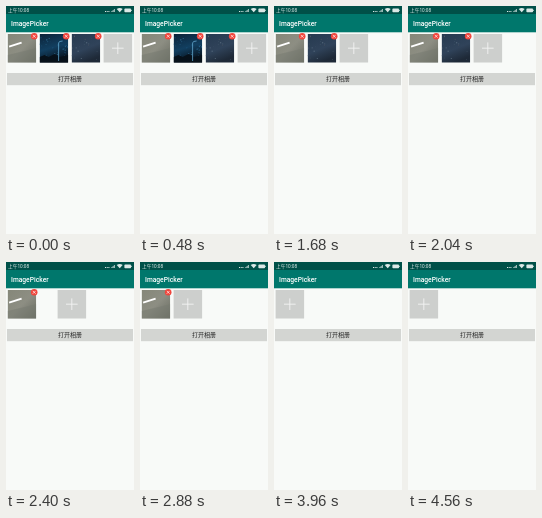
Recreate the animation shown at these times as an HTML page. Size 128x228 px, loop 4.68 s.

```html
<!DOCTYPE html>
<html lang="zh">
<head>
<meta charset="utf-8">
<title>ImagePicker</title>
<style>
  html, body { margin: 0; width: 100%; height: 100%; overflow: hidden; background: #f8faf8; }
  svg { display: block; width: 100vw; height: 100vh; }
  text { font-family: Roboto, "Noto Sans CJK SC", "Noto Sans CJK", sans-serif; }
</style>
</head>
<body>
<svg viewBox="0 0 128 228">
  <defs>
    <clipPath id="tile"><path d="M0 0h28.5v28.5H0z"/></clipPath>
    <linearGradient id="wall" x2="1" y2="1">
      <stop stop-color="#858779"/><stop offset=".5" stop-color="#8d8e83"/><stop offset="1" stop-color="#66695f"/>
    </linearGradient>
    <linearGradient id="night" x2=".3" y2="1">
      <stop stop-color="#0b2237"/><stop offset=".55" stop-color="#123f60"/><stop offset="1" stop-color="#07121d"/>
    </linearGradient>
    <linearGradient id="sky" x2=".4" y2="1">
      <stop stop-color="#263a50"/><stop offset=".6" stop-color="#30435a"/><stop offset="1" stop-color="#1e2937"/>
    </linearGradient>
    <g id="close">
      <circle cx="26.6" cy="2.3" r="3.3" fill="#f0453c"/>
      <path d="M25.2 .9l2.8 2.8m0-2.8l-2.8 2.8" stroke="#fff" stroke-width=".7"/>
    </g>
  </defs>

  <rect width="128" height="228" fill="#f8faf8"/>
  <rect y="8" width="128" height="18.3" fill="#00776c"/>
  <rect width="128" height="8" fill="#005048"/>
  <text x="2" y="6.1" font-size="4.7" fill="#e4efed">上午10:08</text>
  <g fill="#dbe8e6">
    <path d="M99 5h1v1h-1zm1.7 0h1v1h-1zm1.7 0h1v1h-1z"/>
    <path d="M105.5 6v-1h.8v1zm1.2 0v-2h.8v2zm1.2 0v-3h.8v3z"/>
    <path d="M113.7 6.3l-3-3.2q3-2 6 0z"/>
    <rect x="118.4" y="2.6" width="6.6" height="3.6" rx=".8"/>
    <path d="M125.3 3.7h.7v1.4h-.7z"/>
  </g>
  <text x="5" y="19.5" font-size="6.7" font-weight="500" fill="#fff">ImagePicker</text>

  <g id="first">
    <g clip-path="url(#tile)">
      <rect width="29" height="29" fill="url(#wall)"/>
      <path d="M0 21L29 14V29H0z" fill="#777a70" opacity=".5"/>
      <path d="M1.5 12.6L14 8.6" stroke="#fff" stroke-width="2"/>
    </g>
    <use href="#close"/>
  </g>
  <g id="second">
    <g clip-path="url(#tile)">
      <rect width="29" height="29" fill="url(#night)"/>
      <g id="lights"></g>
      <path d="M0 29V23l5-2 4 2 6-3 5 3 9-2v8z" fill="#07111a"/>
      <path d="M19 27V9q0-2 4-2" fill="none" stroke="#62a8cf" stroke-width=".8"/>
    </g>
    <use href="#close"/>
  </g>
  <g id="third">
    <g clip-path="url(#tile)">
      <rect width="29" height="29" fill="url(#sky)"/>
      <g id="stars"></g>
    </g>
    <use href="#close"/>
  </g>
  <g id="add">
    <rect width="28.5" height="28.5" fill="#cdcfcd"/>
    <path d="M14.2 8.4v11.6M8.4 14.2h11.6" stroke="#f3f4f3" stroke-width=".9"/>
  </g>

  <rect x="1" y="67" width="126" height="12.2" fill="#d3d5d2"/>
  <text x="64" y="75.2" font-size="6" text-anchor="middle" fill="#222">打开相册</text>
</svg>
<script>
const LOOP = 4680, STEP = 120, FADE = 120, MOVE = 250, PITCH = 32;
const REMOVALS = [1200, 2165, 3157];
const el = id => document.getElementById(id);

function scatter(id, count, seed, colors) {
  const random = () => (seed = seed * 16807 % 2147483647) / 2147483647;
  for (let i = 0; i < count; i++) {
    const dot = document.createElementNS("http://www.w3.org/2000/svg", "circle");
    const attrs = {
      cx: random() * 28, cy: 2 + random() * 24, r: .25 + random() * .45,
      fill: colors[i % colors.length], opacity: .5 + random() * .4
    };
    for (const name in attrs) dot.setAttribute(name, attrs[name]);
    el(id).append(dot);
  }
}
scatter("lights", 38, 71, ["#2773a3", "#184e78", "#3e8dba"]);
scatter("stars", 20, 29, ["#6d8091", "#526579", "#786861"]);

const clamp = v => Math.max(0, Math.min(1, v));
const progress = (t, start, duration) => clamp((t - start) / duration);
const ease = p => (1 - Math.cos(Math.PI * p)) / 2;

function place(id, slot, opacity) {
  el(id).setAttribute("transform", `translate(${1.6 + slot * PITCH} 28)`);
  el(id).setAttribute("opacity", opacity);
}

function draw(t) {
  const [a, b, c] = REMOVALS;
  const fade = start => 1 - progress(t, start, FADE);
  const slide = start => ease(progress(t, start + FADE, MOVE));
  const addOpacity = t < a ? 1 : progress(t, a + FADE + MOVE - 20, FADE);
  const addSlot = (t < a ? 3 : 2) - slide(b) - slide(c);

  place("first", 0, fade(c));
  place("second", 1, fade(a));
  place("third", 2 - slide(a), fade(b));
  place("add", addSlot, addOpacity);
}

const began = performance.now();
function tick() {
  const t = (performance.now() - began) % LOOP;
  draw(Math.floor(t / STEP) * STEP);
  requestAnimationFrame(tick);
}
tick();
</script>
</body>
</html>
```
